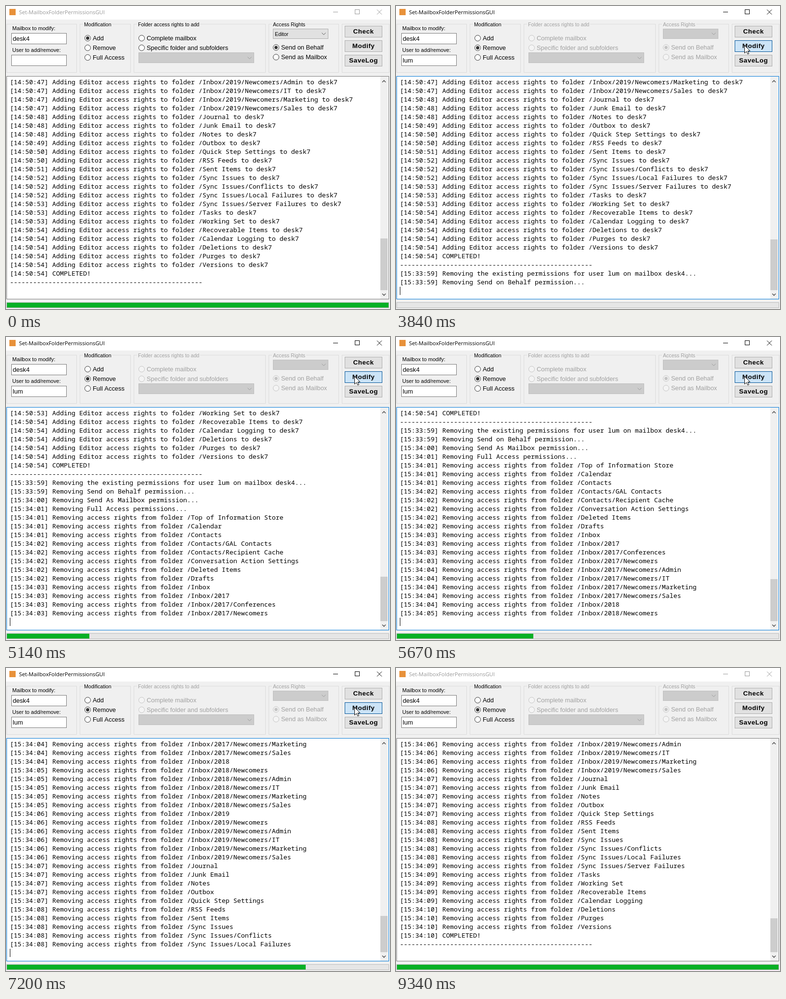
Animation, 797 px wide and 627 px high, one loop 9.49 s. Source, as an HTML page with a canvas:

```html
<!DOCTYPE html>
<html lang="en">
<head>
<meta charset="utf-8">
<title>Set-MailboxFolderPermissionsGUI</title>
<style>
html, body { margin: 0; width: 100%; height: 100%; overflow: hidden; background: #f0f0f0; }
canvas { display: block; }
</style>
</head>
<body>
<canvas id="stage" width="797" height="627"></canvas>
<script>
const ctx = document.getElementById('stage').getContext('2d');
const LOOP = 9490;
const SANS = '"Liberation Sans", Arial, sans-serif';
const MONO = '13.333px "Noto Sans Mono", monospace';
const TITLE = '11.25px "Open Sans", sans-serif';
const BLUE = '#0078d7', GREY = '#7a7a7a', DIM = '#a0a0a0';
const MAILBOX = 'desk4', DELEGATE = 'desk7', REMOVED = 'lum';

const CLICK_FIELD = 780, CLICK_REMOVE = 2150, CLICK_MODIFY = 3380;
const LOG_START = 3440, DONE = 7900, WAKE = 70, SLEEP = 9340;

// Bursts of screen updates: start, end, number of updates
const BURSTS = [
  [0, 0, 1], [70, 1000, 13], [1080, 2000, 13], [2080, 2230, 3], [2380, 3300, 13],
  [3380, 4300, 13], [4400, 5290, 13], [5370, 6290, 13], [6360, 7280, 13],
  [7360, 8260, 13], [8340, 8880, 8], [9340, 9340, 1]
];
const POINTER = [
  [70, 300, 622], [420, 150, 260], [740, 62, 112], [1240, 62, 112], [1650, 290, 98],
  [2000, 203, 86], [2300, 205, 87], [2457, 245, 87], [2800, 520, 84], [3100, 736, 82],
  [3300, 723, 81], [7900, 723, 81], [8050, 727, 50], [8180, 727, 62], [8340, 728, 82],
  [8600, 752, 300], [8880, 798, 630]
];
const LINES = [[3440, 1], [3530, 2], [3850, 3], [4100, 4], [4400, 7], [5140, 16], [6290, 30], [7200, 42], [7890, 50]];
const PROGRESS = [[4250, 0], [4400, 16], [5140, 171], [6290, 412], [7200, 619], [8000, 793]];

// Log contents
const teams = dir => [dir, ...['Admin', 'IT', 'Marketing', 'Sales'].map(s => dir + '/' + s)];
const folders = [
  'Top of Information Store', 'Calendar', 'Contacts', 'Contacts/GAL Contacts',
  'Contacts/Recipient Cache', 'Conversation Action Settings', 'Deleted Items', 'Drafts',
  'Inbox', 'Inbox/2017', 'Inbox/2017/Conferences', ...teams('Inbox/2017/Newcomers'),
  'Inbox/2018', ...teams('Inbox/2018/Newcomers'),
  'Inbox/2019', ...teams('Inbox/2019/Newcomers'),
  'Journal', 'Junk Email', 'Notes', 'Outbox', 'Quick Step Settings', 'RSS Feeds', 'Sent Items',
  'Sync Issues', 'Sync Issues/Conflicts', 'Sync Issues/Local Failures', 'Sync Issues/Server Failures',
  'Tasks', 'Working Set', 'Recoverable Items', 'Calendar Logging', 'Deletions', 'Purges', 'Versions'
];
// One second stamp per line, from the number of lines in each second
const stamps = (prefix, first, counts) => counts.flatMap((n, i) =>
  Array(n).fill(`[${prefix}:${String(first + i).padStart(2, '0')}] `));
const addStamps = stamps('14:50', 47, [4, 3, 1, 2, 1, 3, 3, 5]);
const removeStamps = stamps('15:34', 1, [3, 5, 4, 5, 5, 6, 5, 5, 5, 3]);
const RULE = '-'.repeat(50);
const log = [
  ...folders.slice(24).map((f, i) => `${addStamps[i]}Adding Editor access rights to folder /${f} to ${DELEGATE}`),
  '[14:50:54] COMPLETED!', RULE,
  `[15:33:59] Removing the existing permissions for user ${REMOVED} on mailbox ${MAILBOX}...`,
  '[15:33:59] Removing Send on Behalf permission...',
  '[15:34:00] Removing Send As Mailbox permission...',
  '[15:34:01] Removing Full Access permissions...',
  ...folders.map((f, i) => `${removeStamps[i]}Removing access rights from folder /${f}`),
  '[15:34:10] COMPLETED!', RULE
];

// Linear interpolation over rows of [time, value...]
function at(rows, t, col = 1) {
  if (t <= rows[0][0]) return rows[0][col];
  for (let i = 1; i < rows.length; i++) {
    const a = rows[i - 1], b = rows[i];
    if (t <= b[0]) return a[col] + (b[col] - a[col]) * (t - a[0]) / (b[0] - a[0]);
  }
  return rows[rows.length - 1][col];
}

function snap(t) {
  const [a, b, n] = BURSTS.filter(s => s[0] <= t + 8).pop();
  if (n === 1) return a;
  const step = (b - a) / (n - 1);
  return a + step * Math.min(n - 1, Math.floor((t + 8 - a) / step));
}

function rect(x, y, w, h, fill) {
  ctx.fillStyle = fill;
  ctx.fillRect(x, y, w, h);
}
function box(x, y, w, h, edge, fill) {
  rect(x, y, w, h, edge);
  rect(x + 1, y + 1, w - 2, h - 2, fill);
}
function text(s, x, y, font, color = '#000') {
  ctx.font = font;
  ctx.fillStyle = color;
  ctx.fillText(s, x, y);
}
function stroke(points, color, width = 1) {
  ctx.beginPath();
  points.forEach(([x, y], i) => i ? ctx.lineTo(x, y) : ctx.moveTo(x, y));
  ctx.strokeStyle = color;
  ctx.lineWidth = width;
  ctx.stroke();
}
function chevron(x, y, dir, r, color, width) {
  stroke([[x - r, y - dir * r / 2], [x, y + dir * r / 2], [x + r, y - dir * r / 2]], color, width);
}
const sans = size => `${size}px ${SANS}`;

function group(x, w, title, on = true) {
  box(x, 37, w, 101, '#dcdcdc', '#f0f0f0');
  if (!title) return;
  ctx.font = sans(10.6);
  rect(x + 7, 36, ctx.measureText(title).width + 4, 3, '#f0f0f0');
  text(title, x + 9, 42, sans(10.6), on ? '#000' : DIM);
}

function radio(x, y, label, checked, on = true, hover = false) {
  const color = !on ? '#c4c4c4' : hover ? BLUE : '#333';
  ctx.beginPath();
  ctx.arc(x, y, 6, 0, 7);
  ctx.fillStyle = on ? '#fff' : '#f4f4f4';
  ctx.fill();
  ctx.strokeStyle = color;
  ctx.lineWidth = 1;
  ctx.stroke();
  if (checked) {
    ctx.beginPath();
    ctx.arc(x, y, 3.4, 0, 7);
    ctx.fillStyle = color;
    ctx.fill();
  }
  text(label, x + 10.5, y + 4.5, sans(12.9), on ? '#000' : DIM);
}

function field(y, value, focused) {
  box(11, y, 115, 23, focused ? BLUE : GREY, '#fff');
  text(value, 14, y + 16, sans(13.1));
}

function button(y, label, mouse, pressed) {
  const hover = mouse && mouse.x >= 703 && mouse.x < 781 && mouse.y >= y && mouse.y < y + 24;
  const [edge, fill] = pressed ? ['#005499', '#cce4f7'] : hover ? [BLUE, '#e5f1fb'] : ['#adadad', '#e1e1e1'];
  box(703, y, 78, 24, edge, fill);
  ctx.textAlign = 'center';
  ctx.letterSpacing = '0.5px';
  text(label, 742, y + 16, `bold 13.5px ${SANS}`);
  ctx.letterSpacing = '0px';
  ctx.textAlign = 'left';
}

function titleBar(active) {
  const color = active ? '#000' : '#999';
  rect(0, 0, 797, 28, '#fff');
  rect(7, 6, 13, 13, '#e8913a');
  text('Set-MailboxFolderPermissionsGUI', 27, 17, TITLE, color);
  rect(679, 12, 10, 1, color);
  box(724, 7, 10, 10, color, '#fff');
  stroke([[770, 7.5], [780, 17.5]], color);
  stroke([[780, 7.5], [770, 17.5]], color);
}

function controls(t, mouse) {
  const removing = t >= CLICK_REMOVE, on = !removing;
  const typing = t >= CLICK_FIELD && t < CLICK_REMOVE;
  const typed = [960, 1150, 1300].filter(k => t >= k).length;
  const overRemove = mouse && mouse.x >= 163 && mouse.x < 232 && mouse.y >= 78 && mouse.y < 95;

  group(1, 146);
  text('Mailbox to modify:', 13, 50, sans(11.1));
  field(56, MAILBOX, false);
  text('User to add/remove:', 13, 95, sans(11.1));
  const value = REMOVED.slice(0, typed);
  field(101, value, typing);
  if (typing && (typed < 3 || t % 1060 < 530)) {
    rect(Math.round(15 + ctx.measureText(value).width), 105, 1, 15, '#000');
  }

  group(153, 106, 'Modification');
  radio(169.5, 66.5, 'Add', !removing);
  radio(169.5, 86.5, 'Remove', removing, true, overRemove);
  radio(169.5, 106.5, 'Full Access', false);

  group(265, 274, 'Folder access rights to add', on);
  radio(281.5, 66.5, 'Complete mailbox', false, on);
  radio(281.5, 86.5, 'Specific folder and subfolders', false, on);
  box(275, 96, 240, 22, '#bfbfbf', '#cccccc');
  chevron(505.5, 107.5, 1, 4, '#9a9a9a');

  group(545, 146, 'Access Rights', on);
  box(554, 47, 115, 21, on ? '#adadad' : '#bfbfbf', on ? '#e1e1e1' : '#cccccc');
  if (on) text('Editor', 558, 62, sans(10.8));
  chevron(659.5, 57.5, 1, 4, on ? '#555' : '#9a9a9a');
  radio(560.5, 85.8, 'Send on Behalf', true, on);
  radio(560.5, 105.8, 'Send as Mailbox', false, on);

  group(697, 99);
  button(41, 'Check', mouse, false);
  button(71, 'Modify', mouse, t >= CLICK_MODIFY && t < DONE);
  button(101, 'SaveLog', mouse, false);
}

function logView(t) {
  const running = t >= LOG_START && t < DONE;
  const focused = (t >= WAKE && t < CLICK_FIELD) || (t >= LOG_START && t < SLEEP);
  const added = t < LOG_START ? 0 : t >= DONE ? 52 : Math.floor(at(LINES, t) + 0.02);
  box(1, 145, 794, 462, focused ? BLUE : GREY, '#fff');
  for (let i = 0; i < 24; i++) text(log[added + i], 8, 162 + i * 18, MONO);
  if (focused && (running || t % 1060 < 530)) rect(8, 581, 1, 17, '#000');

  rect(777, 146, 16, 460, '#f0f0f0');
  const h = Math.ceil(10165 / (95 + added));
  rect(777, 588 - h, 15, h, '#cdcdcd');
  chevron(784.5, 156, -1, 3.5, '#555', 1.6);
  chevron(784.5, 597, 1, 3.5, '#555', 1.6);

  box(1, 613, 794, 12, '#bcbcbc', '#e6e6e6');
  const w = t < LOG_START ? 793 : Math.round(at(PROGRESS, t));
  rect(2, 614, Math.min(w, 792), 10, '#06b025');
}

function pointer({ x, y }) {
  if (x > 11 && x < 126 && y > 101 && y < 124) {
    x = Math.round(x);
    y = Math.round(y);
    rect(x, y - 8, 1, 16, '#000');
    for (const d of [-8, 7]) rect(x - 3, y + d, 7, 1, '#000');
    return;
  }
  ctx.save();
  ctx.translate(Math.round(x) + 0.5, Math.round(y) + 0.5);
  ctx.beginPath();
  for (const [px, py] of [[0, 0], [0, 16], [4, 12.5], [6.5, 18], [9, 17], [6.5, 11.5], [11.5, 11.5]]) ctx.lineTo(px, py);
  ctx.closePath();
  ctx.fillStyle = '#fff';
  ctx.fill();
  ctx.strokeStyle = '#000';
  ctx.lineWidth = 1;
  ctx.stroke();
  ctx.restore();
}

function draw(t) {
  const mouse = t >= WAKE && t < 8870 ? { x: at(POINTER, t, 1), y: at(POINTER, t, 2) } : null;
  rect(0, 0, 797, 627, '#f0f0f0');
  titleBar(t >= WAKE && t < SLEEP);
  controls(t, mouse);
  logView(t);
  if (mouse) pointer(mouse);
}

const start = performance.now();
function tick() {
  draw(snap((performance.now() - start) % LOOP));
  requestAnimationFrame(tick);
}
tick();
</script>
</body>
</html>
```
